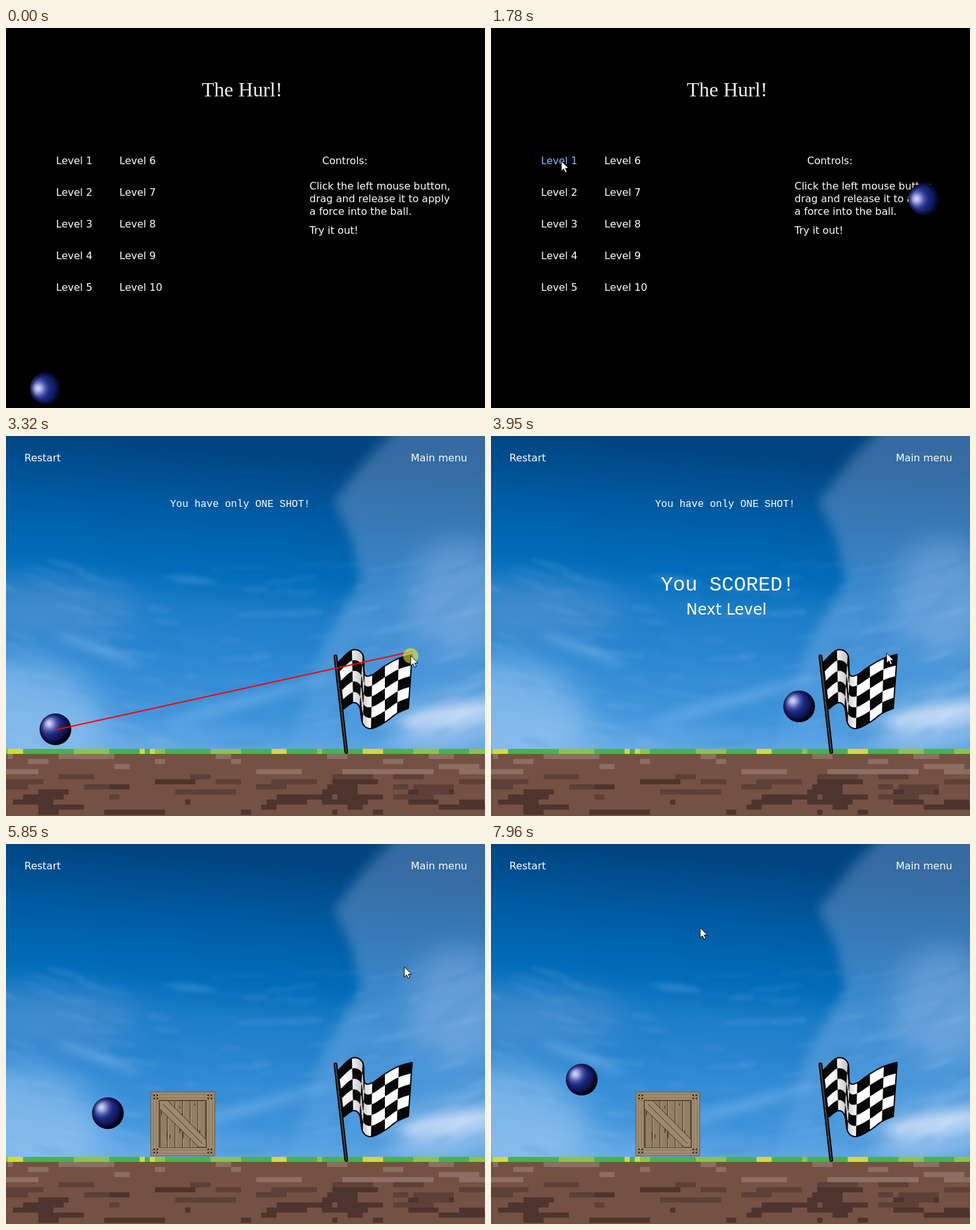
Write an HTML page with a canvas that moves like this. It is 756 px wide and 600 px high and loops after 8000 ms.

```html
<!DOCTYPE html>
<html lang="en">
<head>
<meta charset="utf-8">
<title>Ball game</title>
<style>
html, body { margin: 0; width: 100%; height: 100%; overflow: hidden; background: #000; }
canvas { display: block; }
</style>
</head>
<body>
<canvas id="stage" width="756" height="600"></canvas>
<script>
const W = 756, H = 600, LOOP = 8000, FLOOR = 494, CELL = 8;
const stage = document.getElementById('stage').getContext('2d');
const SANS = '"DejaVu Sans", sans-serif';
const MONO = '"Liberation Mono", monospace';
const SERIF = '"Liberation Serif", serif';

const APPEAR = 70, LEVEL1 = 1880, GOAL = 3918, LEVEL2 = 4550, HIT = 5908, RESTART = 7320;
const PULL = 0.00135, GRAVITY = 0.000292, LAG = 46;

// Each shot: press time, release time, ball start, release point
const SHOTS = {
  menu: { press: 100, release: 865, from: [63, 569], aim: [565, 228] },
  first: { press: 2490, release: 3375, from: [78, 463], aim: [635, 355] },
  second: { press: 5270, release: 5740, from: [78, 463], aim: [630, 197] },
  retry: { press: 7540, release: 7760, from: [78, 463], aim: [318, 106] }
};
const CLICKS = [LEVEL1, LEVEL2, RESTART];

// Turning points of the pointer: time, x, y
const POINTER = [
  [70, 66, 566], [160, 70, 562], [560, 711, 235], [865, 565, 228], [1400, 250, 178],
  [1780, 111, 210], [2050, 111, 212], [2510, 76, 463], [2654, 532, 284], [2700, 553, 285],
  [2900, 668, 284], [3375, 635, 355], [3950, 625, 343], [4180, 469, 282], [4360, 410, 276],
  [4600, 410, 276], [5300, 76, 463], [5740, 630, 197], [5850, 629, 194], [6130, 519, 194],
  [6540, 379, 194], [6980, 379, 194], [7260, 50, 38], [7340, 50, 38], [7570, 76, 463],
  [7760, 318, 106], [7960, 330, 132], [8000, 334, 140]
];

const lerp = (a, b, k) => a + (b - a) * k;

function pointerAt(t) {
  const i = Math.max(1, POINTER.findIndex(p => p[0] > t));
  const [t0, x0, y0] = POINTER[i - 1], [t1, x1, y1] = POINTER[i];
  const k = Math.max(0, (t - t0) / (t1 - t0));
  return [lerp(x0, x1, k), lerp(y0, y1, k)];
}

function shotAt(t) {
  if (t < LEVEL1) return SHOTS.menu;
  if (t < LEVEL2) return SHOTS.first;
  return t < RESTART ? SHOTS.second : SHOTS.retry;
}

function ballAt(t) {
  const shot = shotAt(t), { from: [x, y], aim } = shot;
  const d = Math.max(0, (shot === SHOTS.first ? Math.min(t, GOAL) : t) - shot.release);
  const pos = [x + (aim[0] - x) * PULL * d, y + (aim[1] - y) * PULL * d + GRAVITY * d * d / 2];
  if (shot === SHOTS.second && t > HIT) pos[0] = 203 - 0.39 * (t - HIT);
  return pos;
}

function crateX(t) {
  if (t < HIT || t >= RESTART) return 228;
  const k = Math.min(1, (t - HIT) / 400);
  return 228 + 20 * (1 - (1 - k) ** 2);
}

function seeded(seed) {
  return () => (seed = seed * 16807 % 2147483647) / 2147483647;
}

function layer(w, h, ...painters) {
  const c = document.createElement('canvas');
  c.width = w;
  c.height = h;
  painters.forEach(paint => paint(c.getContext('2d')));
  return c;
}

function ramp(gradient, ...stops) {
  stops.forEach(s => gradient.addColorStop(...s));
  return gradient;
}

function text(g, str, x, y, font, color = '#fff') {
  g.font = font;
  g.fillStyle = color;
  g.fillText(str, x, y);
}

function rect(g, color, x, y, w, h) {
  g.fillStyle = color;
  g.fillRect(x, y, w, h);
}

function poly(g, points) {
  g.beginPath();
  points.forEach(([x, y]) => g.lineTo(x, y));
  g.closePath();
}

function blob(g, color, x, y, rx, ry, turn = 0) {
  g.fillStyle = color;
  g.beginPath();
  g.ellipse(x, y, rx, ry, turn, 0, 7);
  g.fill();
}

function paintSky(g) {
  rect(g, ramp(g.createLinearGradient(40, 0, 0, FLOOR), [0, '#004581'], [0.2, '#005ca4'],
    [0.38, '#006cb9'], [0.5, '#1c7dc8'], [0.64, '#2b87d1'], [0.85, '#4296dc'], [1, '#74b2ea']),
    0, 0, W, FLOOR);

  // Grey cloud bank on the right, fading into haze
  g.filter = 'blur(9px)';
  g.fillStyle = ramp(g.createLinearGradient(0, 0, 0, FLOOR), [0, 'rgba(105,145,190,.5)'],
    [0.3, 'rgba(110,152,205,.5)'], [0.55, 'rgba(140,182,232,.42)'], [1, 'rgba(150,195,240,.1)']);
  poly(g, [[625, -20], [570, 35], [517, 103], [545, 160], [560, 230], [500, 330], [440, 510],
    [800, 510], [800, -20]]);
  g.fill();

  g.filter = 'blur(24px)';
  blob(g, 'rgba(140,178,228,.5)', 715, 255, 80, 90);
  blob(g, 'rgba(190,214,246,.75)', 710, 450, 110, 38, -0.2);
  blob(g, 'rgba(105,155,210,.42)', 60, 275, 150, 45);
  blob(g, 'rgba(160,202,242,.6)', 40, 430, 120, 75, 0.3);
  g.filter = 'blur(8px)';
  blob(g, 'rgba(220,232,252,.7)', 700, 442, 80, 13, -0.15);
  blob(g, 'rgba(155,200,242,.4)', 145, 336, 70, 8, 0.35);
  blob(g, 'rgba(135,188,238,.45)', 380, 418, 140, 9, -0.28);

  // Fine wisps toward the horizon, leaning with the wind
  const rnd = seeded(77);
  g.filter = 'blur(3px)';
  for (let i = 0; i < 260; i++) {
    const x = rnd() * W, y = 200 + 290 * rnd();
    const tone = rnd() < 0.55 ? '175,208,246' : '35,118,195';
    blob(g, `rgba(${tone},${0.05 + rnd() * 0.07})`, x, y, 10 + rnd() * 35, 2 + rnd() * 4,
      lerp(0.35, -0.35, x / W));
  }
  g.filter = 'none';
}

function paintGround(g) {
  rect(g, '#4caf50', 0, FLOOR, W, CELL);
  const grass = (color, runs) => runs.forEach(([x, cells]) => rect(g, color, x, FLOOR, cells * CELL, CELL));
  grass('#8bc34a', [[-5, 1], [107, 7], [235, 2], [323, 6], [491, 1], [643, 5], [731, 4]]);
  grass('#cddc39', [[3, 3], [211, 1], [227, 1], [419, 3], [563, 4]]);

  // Soil: pale bricks near the grass, darker and denser ones below
  rect(g, '#745143', 0, FLOOR + CELL, W, H);
  const rnd = seeded(31);
  for (let row = 0; row < 12; row++)
    for (let x = 3 - CELL * Math.floor(rnd() * 12); x < W; x += CELL * Math.ceil(rnd() * 18)) {
      const w = CELL * Math.ceil(rnd() * 9), deep = rnd() * 5 + row;
      const color = row < 4 ? '#8d6e63' : deep < 9 ? '#5d4037' : '#4e342e';
      if (rnd() < (row < 4 ? 0.28 : 0.55)) rect(g, color, x, FLOOR + CELL * (row + 1), w, CELL);
    }
}

function paintFlag(g) {
  const top = [[524, 358], [546, 338], [563, 345], [566, 376], [578, 377], [598, 363], [620, 351], [641, 345]];
  const low = [[533, 431], [548, 421], [558, 428], [563, 454], [576, 462], [598, 452], [617, 438], [635, 430]];
  const cols = top.length - 1, rows = 5;
  const spline = (p, u) => {
    const i = Math.min(cols - 1, Math.floor(u)), k = u - i;
    const at = j => p[Math.max(0, Math.min(cols, j))];
    return [0, 1].map(d => {
      const a = at(i - 1)[d], b = at(i)[d], c = at(i + 1)[d], e = at(i + 2)[d];
      return b + k * (c - a + k * (2 * a - 5 * b + 4 * c - e + k * (3 * (b - c) + e - a))) / 2;
    });
  };
  const patch = (u0, u1, v0, v1) => {
    const n = (u1 - u0) * 6;
    const edge = v => Array.from({ length: n + 1 }, (_, i) => {
      const u = lerp(u0, u1, i / n), a = spline(top, u), b = spline(low, u);
      return [lerp(a[0], b[0], v), lerp(a[1], b[1], v)];
    });
    poly(g, [...edge(v0), ...edge(v1).reverse()]);
  };
  patch(0, cols, 0, 1);
  g.fillStyle = ramp(g.createLinearGradient(530, 0, 590, 0),
    [0, '#fff'], [0.3, '#eee'], [0.52, '#c9c5c8'], [0.8, '#fff']);
  g.fill();
  g.fillStyle = '#080808';
  for (let i = 0; i < cols; i++)
    for (let j = i % 2; j < rows; j += 2) {
      patch(i, i + 1, j / rows, (j + 1) / rows);
      g.fill();
    }
  patch(0, cols, 0, 1);
  g.strokeStyle = '#000';
  g.lineWidth = 2;
  g.lineJoin = g.lineCap = 'round';
  g.stroke();

  for (const [color, width] of [['#050505', 6], ['#484848', 2]]) {
    g.strokeStyle = color;
    g.lineWidth = width;
    g.beginPath();
    g.moveTo(520, 348);
    g.lineTo(537, 499);
    g.stroke();
  }
}

function paintCrate(g) {
  const rnd = seeded(9), size = 102;
  rect(g, '#6a5a43', 0, 0, size, size);
  rect(g, '#a08c70', 1, 1, size - 2, size - 2);
  rect(g, '#5d4d37', 13, 13, 76, 76);
  rect(g, '#927f62', 16, 15, 70, 73);
  for (let x = 26; x < 84; x += 12) {
    rect(g, '#4a3b28', x, 15, 1, 73);
    rect(g, '#a28e70', x + 1, 15, 2, 73);
  }
  for (let i = 0; i < 16; i++) rect(g, '#30251a', 17 + rnd() * 68, 16 + rnd() * 60, 1, 3 + rnd() * 9);
  poly(g, [[14, 14], [27, 14], [88, 76], [88, 88], [77, 88], [14, 27]]);
  g.fillStyle = '#9d896b';
  g.fill();
  g.strokeStyle = '#40331f';
  g.lineWidth = 1;
  g.stroke();
  g.beginPath();
  g.moveTo(20, 20);
  g.lineTo(82, 82);
  g.stroke();
  // Grain and nails, the same on all four sides
  for (let side = 0; side < 4; side++) {
    for (const k of [4, 9]) rect(g, 'rgba(70,54,34,.3)', 2, k, 98, 1);
    for (const [x, y] of [[5, 5], [10, 5], [5, 10], [10, 10]]) rect(g, '#1d150d', x, y, 2, 2);
    g.translate(size, 0);
    g.rotate(Math.PI / 2);
  }
}

const scene = layer(W, H, paintSky, paintGround, paintFlag);
const crate = layer(102, 102, paintCrate);

function drawBall(g, x, y, inMenu) {
  const hx = x - (inMenu ? 12 : 10), hy = y - (inMenu ? 0 : 9);
  blob(g, ramp(g.createRadialGradient(hx, hy, 0, hx, hy, 36), [0, '#dcdcff'], [0.12, '#b0b2e8'],
    [0.34, '#4450a4'], [0.5, '#1c2a80'], [0.72, '#101a5c'], [0.9, '#050a2a'], [1, '#000004']), x, y, 25, 25);
  blob(g, ramp(g.createRadialGradient(x, y, 18, x, y, 25), [0, 'rgba(0,0,20,0)'], [1, 'rgba(0,0,20,.6)']),
    x, y, 25, 25);
}

function drawPointer(g, x, y, pressed) {
  if (pressed) blob(g, 'rgba(240,240,40,.58)', x, y, 12, 12);
  poly(g, [[0, 0], [0, 16], [3.7, 12.6], [6.2, 18.2], [8.8, 17], [6.4, 11.6], [11.3, 11.5]]
    .map(([a, b]) => [x + a, y + b]));
  g.fillStyle = '#fff';
  g.fill();
  g.strokeStyle = '#000';
  g.lineWidth = 1;
  g.lineJoin = 'miter';
  g.stroke();
}

function drawMenu(g, hover) {
  const body = '16px ' + SANS;
  rect(g, '#000', 0, 0, W, H);
  g.filter = 'blur(.6px)';
  text(g, 'The Hurl!', 309, 108, '32px ' + SERIF, '#f0f0f0');
  g.filter = 'none';
  for (let i = 0; i < 10; i++)
    text(g, 'Level ' + (i + 1), i < 5 ? 79 : 179, 215 + i % 5 * 50, body, hover && !i ? '#8fb8ff' : '#fff');
  text(g, 'Controls:', 499, 215, body);
  ['Click the left mouse button,', 'drag and release it to apply', 'a force into the ball.']
    .forEach((line, i) => text(g, line, 479, 255 + i * 20, body));
  text(g, 'Try it out!', 479, 325, body);
}

function drawLevel(g, t, hover) {
  g.drawImage(scene, 0, 0);
  text(g, 'Restart', 29, 40, '16px ' + SANS);
  text(g, 'Main menu', 639, 40, '16px ' + SANS);
  if (t >= LEVEL2) {
    g.drawImage(crate, crateX(t), 391);
    return;
  }
  text(g, 'You have only ONE SHOT!', 259, 112, '16px ' + MONO);
  if (t < GOAL) return;
  g.filter = 'blur(.5px)';
  text(g, 'You SCORED!', 268, 244, '32px ' + MONO);
  text(g, 'Next Level', 308, 282, '24px ' + SANS, hover ? '#8fb8ff' : '#fff');
  g.filter = 'none';
}

function draw(g, t) {
  const [px, py] = pointerAt(t), [bx, by] = ballAt(t), { press, release } = shotAt(t);
  const over = (x0, y0, x1, y1) => t >= APPEAR && px >= x0 && px <= x1 && py >= y0 && py <= y1;
  const inMenu = t < LEVEL1, dragging = t >= press && t < release;
  if (inMenu) drawMenu(g, over(78, 198, 137, 218));
  else drawLevel(g, t, over(309, 260, 437, 288));
  drawBall(g, bx, by, inMenu);
  if (dragging) {
    g.strokeStyle = '#f00';
    g.lineWidth = 2;
    g.lineCap = 'butt';
    g.beginPath();
    g.moveTo(bx, by + 1);
    g.lineTo(...pointerAt(t - LAG));
    g.stroke();
  }
  const clicking = CLICKS.some(c => t >= c - 45 && t < c);
  if (t >= APPEAR) drawPointer(g, px, py, dragging || clicking);
}

const begin = performance.now();
function frame() {
  draw(stage, (performance.now() - begin) % LOOP);
  requestAnimationFrame(frame);
}
frame();
</script>
</body>
</html>
```
